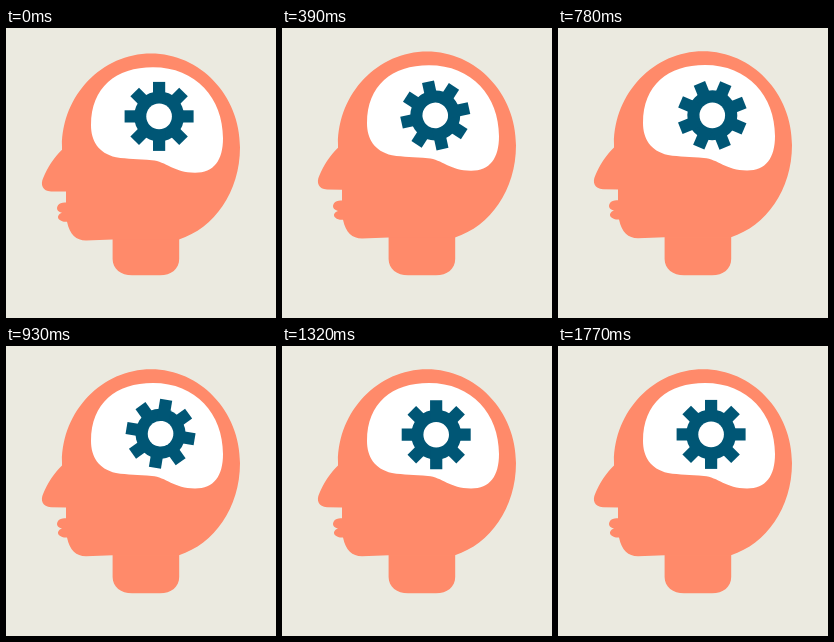
Write an HTML page with a canvas that moves like this. It is 270 px wide and 290 px high and loops after 1.8 s.

```html
<!DOCTYPE html>
<html lang="en">
<head>
<meta charset="utf-8">
<title>Thinking head</title>
<style>
html, body { margin: 0; width: 100%; height: 100%; overflow: hidden; background: #ebeae0; }
canvas { display: block; width: 270px; height: 290px; }
</style>
</head>
<body>
<canvas id="stage"></canvas>
<script>
const W = 270, H = 290, LOOP = 1800, STEP = 30, STEPS = LOOP / STEP;
const BG = '#ebeae0', SKIN = '#ff8a6a', GEAR = '#005675';
const TAU = Math.PI * 2;

const canvas = document.getElementById('stage');
const ctx = canvas.getContext('2d');
const dpr = window.devicePixelRatio || 1;
canvas.width = W * dpr;
canvas.height = H * dpr;

const head = new Path2D(`M145 23.2
  C194 23.2 234 65 234 117 C234 162 208 198 173 209.2
  L106.6 209.2 L80 210.2 C70 210 64 205 61 191.5
  C55 192 50.8 188.5 52.3 185.5 C53 184 54.5 183.2 56 182.6
  C51 181.5 50 178 52 175 C53.5 172.8 56.5 172 60 172.3
  L60 161.4 L45 161.2 C36.5 160.8 34 154.5 37.3 147.5
  C41 138 48 127 56 119.5 L56 116 C56 65 96 23.2 145 23.2 Z`);

const brain = new Path2D(`M85 95
  C85 57 110 37 147 37 C190 37 217 68 217 108
  C217 130 208 142.5 189 142.5 C168 142.5 160 131 146 130
  C132 128.5 122 129 110 127 C92 123 85 110 85 95 Z`);

const neck = new Path2D(`M106.6 195 H173.2 V231
  C173.2 241 165 247.3 154 247.3 H126 C115 247.3 106.6 241 106.6 231 Z`);

// Head offset: [step, pixels below rest]
const bob = [[0, 2.2], [10, -0.3], [19, 2], [26, 0]];

function headOffset(step) {
  for (let i = 1; i < bob.length; i++) {
    const [a, from] = bob[i - 1], [b, to] = bob[i];
    if (step <= b) {
      const k = (step - a) / (b - a);
      return from + (to - from) * k * k * (3 - 2 * k);
    }
  }
  return 0;
}

// One full turn, very slightly eased at both ends
function gearAngle(step) {
  const turn = step / (STEPS - 1) * TAU;
  return turn - 0.026 * Math.sin(turn);
}

function fill(path, color) {
  ctx.fillStyle = color;
  ctx.fill(path);
}

function disc(r, color) {
  ctx.fillStyle = color;
  ctx.beginPath();
  ctx.arc(0, 0, r, 0, TAU);
  ctx.fill();
}

function drawGear(angle) {
  ctx.save();
  // The pivot lies slightly off the hub, so the gear wobbles
  ctx.translate(153.8, 88);
  ctx.rotate(angle);
  ctx.translate(-0.7, 0.4);
  disc(25, GEAR);
  for (let i = 0; i < 4; i++) {
    ctx.fillRect(-6.1, -34.5, 12.2, 69);
    ctx.rotate(Math.PI / 4);
  }
  disc(12.8, '#fff');
  ctx.restore();
}

function draw(now) {
  const step = Math.floor((now % LOOP) / STEP);
  ctx.setTransform(dpr, 0, 0, dpr, 0, 0);
  ctx.fillStyle = BG;
  ctx.fillRect(0, 0, W, H);
  fill(neck, SKIN);
  ctx.save();
  ctx.translate(0, headOffset(step));
  fill(head, SKIN);
  fill(brain, '#fff');
  ctx.restore();
  drawGear(gearAngle(step));
}

let start = null;
function tick(now) {
  if (start === null) start = now;
  draw(now - start);
  requestAnimationFrame(tick);
}
draw(0);
requestAnimationFrame(tick);
</script>
</body>
</html>
```
